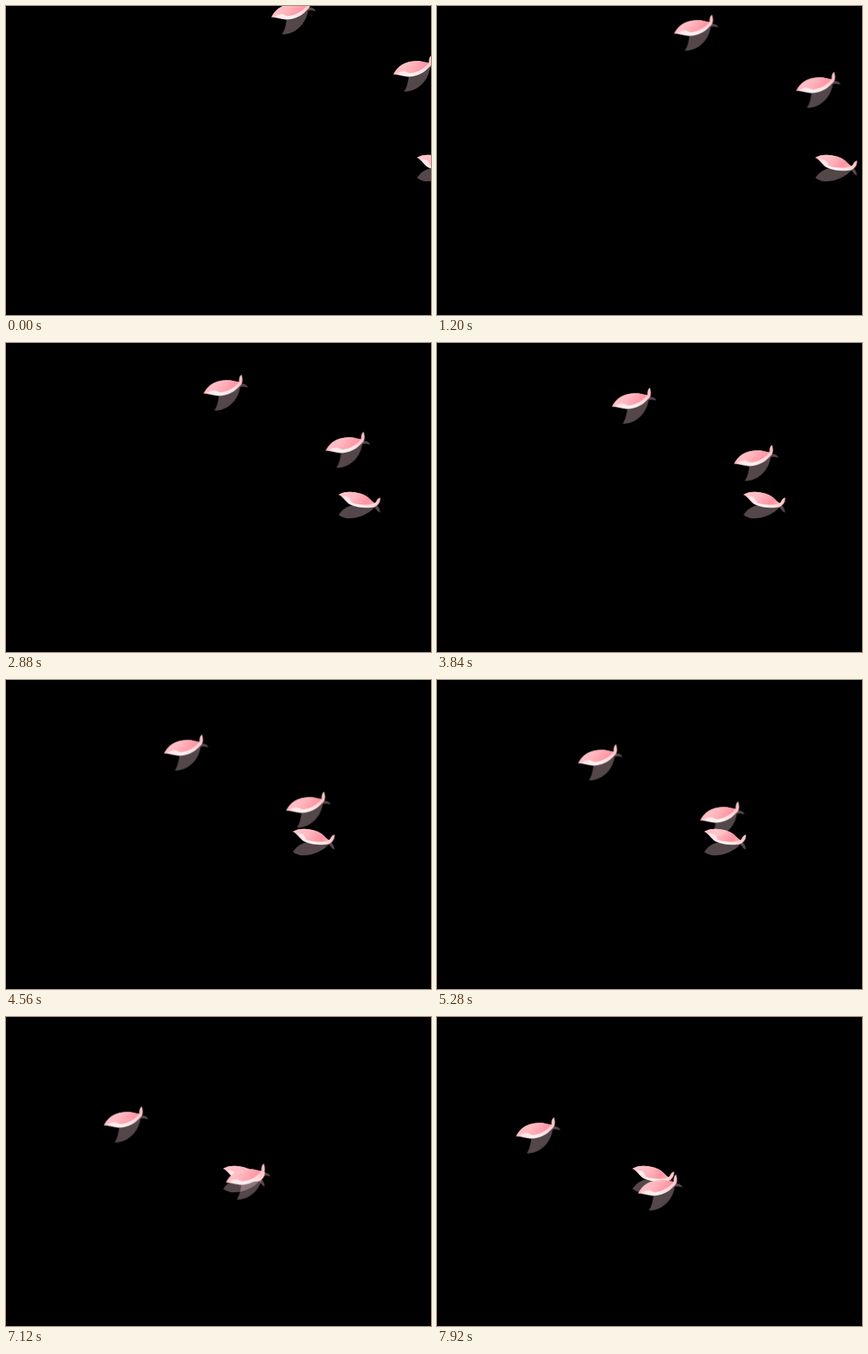
An HTML page that plays this animation: 550x400 px, repeating every 8 s.

```html
<!DOCTYPE html>
<html lang="en">
<head>
<meta charset="utf-8">
<title>Drifting petals</title>
<style>
  html, body { margin: 0; width: 100%; height: 100%; overflow: hidden; background: #000; }
  svg { display: block; width: 550px; height: 400px; }
  .drift { animation: drift 8s steps(100, end) infinite; }
  .fall { --dx: -243.5px; --dy: 141.2px; }
  .glide { --dx: -281.8px; --dy: 0px; }
  @keyframes drift {
    from { transform: translate(0, 0); }
    to { transform: translate(var(--dx), var(--dy)); }
  }
  .shade { fill: #ffd6dc; fill-opacity: .33; }
</style>
</head>
<body>
<svg viewBox="0 0 550 400">
  <defs>
    <linearGradient id="rim">
      <stop offset="0" stop-color="#ffb4bd"/>
      <stop offset=".16" stop-color="#ffe6e8"/>
      <stop offset=".5" stop-color="#fff4f4"/>
      <stop offset=".8" stop-color="#ffdcdf"/>
      <stop offset="1" stop-color="#ffbcc4"/>
    </linearGradient>
    <linearGradient id="cup" x1="0" y1=".35" x2="1" y2=".65">
      <stop offset="0" stop-color="#ffc6cb"/>
      <stop offset=".4" stop-color="#ffb9c0"/>
      <stop offset=".85" stop-color="#ff93a2"/>
      <stop offset="1" stop-color="#ffa5b0"/>
    </linearGradient>

    <!-- petals have their left tip at the origin -->
    <g id="raised">
      <path class="shade" d="M20 1 C19 8 18 17 13.6 21.9 C26 23.5 44 13 47.4 -8.5 C51 -10 53 -8.6 57.6 -8.2 C55 -12.5 51 -13.5 46 -12.5 L28 -4Z"/>
      <path fill="url(#rim)" d="M0 0 C5 -10 14 -17 29 -17.3 C37 -17.6 42 -15 46 -15 C45.8 -19 46 -22 48.9 -24.6 C51 -19 51 -13 47 -10 C40 -2 30 3 20 3 C14 3 9 .6 0 0Z"/>
      <path fill="url(#cup)" d="M0 0 C5 -10 14 -17 29 -17.3 C37 -17.6 42 -15 45.8 -15 C41 -8 31 -2.2 22 -1.6 C18 -1.6 17 -4.2 13 -4 C8 -3.8 5 -1 0 0Z"/>
    </g>
    <g id="lying">
      <path class="shade" d="M0 26.3 C4 20 11 14 22 13.5 L47 13 C50 13 54 18 53.7 23.2 C50.5 22.5 49 19 46.5 16.5 C40 24 27 31 13 30.9 C8 30.8 3 28.5 0 26.3Z"/>
      <path fill="url(#rim)" d="M0 0 C9 -5.5 22 -3.8 32 0 C39 3 42 8 46.5 11 C49.5 9.5 49 5 53.8 3.7 C54.5 9 51.5 14 46.5 16 C38 18.4 23 16.8 14 12.5 C9 9.5 7 4 0 0Z"/>
      <path fill="url(#cup)" d="M0 0 C9 -5.5 22 -3.8 32 0 C39 3 42 8 46 11.2 C40 14.4 25 13.5 17.5 10.5 C15 8 15.5 4 11 2.8 C7 1.8 4 1.8 0 0Z"/>
    </g>
  </defs>

  <g class="drift glide"><use href="#lying" x="531.9" y="196.2"/></g>
  <g class="drift fall">
    <use href="#raised" x="343.4" y="14.6"/>
    <use href="#raised" x="501.4" y="88.6"/>
  </g>
</svg>
</body>
</html>
```
